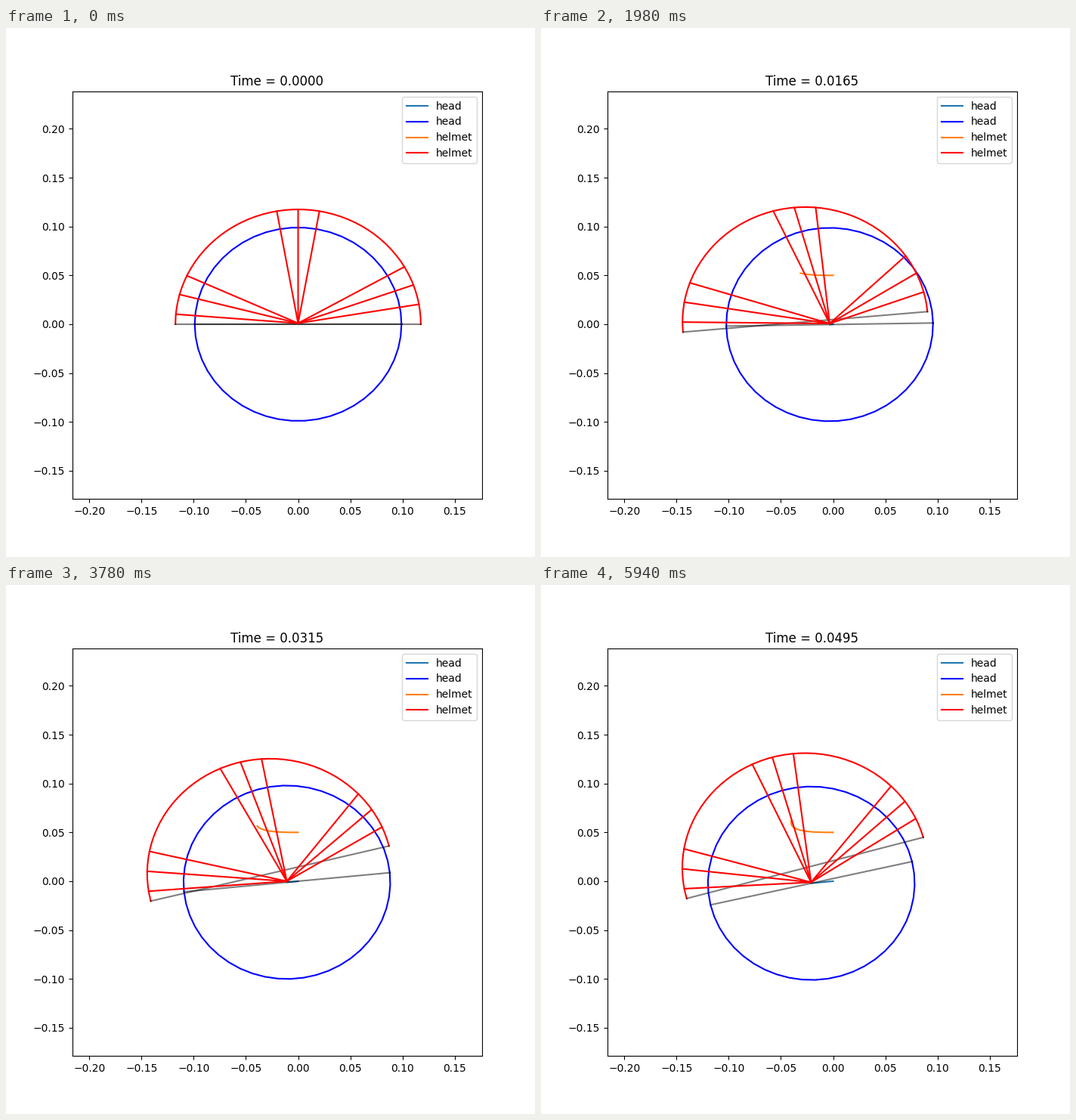
A matplotlib script that plays this animation: 700 px wide and 700 px high, repeating every 6 s.

```python
import numpy as np
import matplotlib.pyplot as plt
from matplotlib.animation import FuncAnimation

FRAMES, INTERVAL, STEP = 100, 60, 0.5  # STEP is simulated ms per frame
R_HEAD, R_HELMET, CM_HEIGHT = 0.099, 0.1175, 0.05
SPRING_ANGLES = np.radians(np.add.outer([20, 90, 165], [-10, 0, 10]).ravel())
SPRING_ROOT = (0.0, 0.001)


def speed_up(t, lag):
    """Start at rest and approach unit speed, ending 2 * lag behind."""
    return t - 2 * lag + (t + 2 * lag) * np.exp(-t / lag)


def soft_start(t, start, width):
    """Smooth bend from standing still to unit speed around start."""
    return width * np.log1p(np.exp((t - start) / width))


def head_pose(t):
    """Position and angle of the head, dragged along by the springs."""
    pull = speed_up(t, 6.6)
    return -575e-6 * pull, -57e-6 * pull, 0.0071 * soft_start(t, 17.7, 4)


def helmet_pose(t):
    """The helmet slides left, is braked by the springs and turns."""
    x = -0.0397 * (1 - np.exp(-0.0755 * t) * np.cos(0.044 * t))
    y = CM_HEIGHT + 300e-6 * speed_up(t, 5.1)
    angle = 0.27 * (1 - np.exp(0.0285 * t - 0.0032 * t ** 2))
    return x, y, angle


def place(pose, x, y):
    """Move body coordinates into the plot."""
    px, py, a = pose
    c, s = np.cos(a), np.sin(a)
    x, y = np.asarray(x), np.asarray(y)
    return px + c * x - s * y, py + s * x + c * y


def arc(radius, angles, drop=0.0):
    return radius * np.cos(angles), radius * np.sin(angles) - drop


times = np.arange(FRAMES) * STEP
head_path = np.column_stack(head_pose(times))
helmet_path = np.column_stack(helmet_pose(times))

ends = np.array([np.pi, 0])
head_shape = arc(R_HEAD, np.linspace(0, 2 * np.pi, 51))
head_base = arc(R_HEAD, ends)
shell_shape = arc(R_HELMET, np.linspace(0, np.pi, 50), CM_HEIGHT)
shell_base = arc(R_HELMET, ends, CM_HEIGHT)
spring_tips = arc(R_HELMET, SPRING_ANGLES, CM_HEIGHT)

fig, ax = plt.subplots(figsize=(7, 7), dpi=100)
ax.set_xlim(-0.2164, 0.1762)
ax.set_ylim(-0.1787, 0.2382)


def line(color, **kw):
    return ax.plot([], [], color=color, **kw)[0]


head_track = line("C0", label="head")
head = line("blue", label="head")
head_axis = line("black", alpha=0.5)
helmet_track = line("C1", label="helmet")
shell = line("red", label="helmet")
shell_axis = line("black", alpha=0.5)
springs = [line("red") for _ in SPRING_ANGLES]
title = ax.set_title("Time = 0.0000")
ax.legend(loc="upper right")


def update(i):
    h, s = head_path[i], helmet_path[i]
    head_track.set_data(*head_path[:i + 1, :2].T)
    helmet_track.set_data(*helmet_path[:i + 1, :2].T)
    head.set_data(*place(h, *head_shape))
    head_axis.set_data(*place(h, *head_base))
    shell.set_data(*place(s, *shell_shape))
    shell_axis.set_data(*place(s, *shell_base))
    rx, ry = place(h, *SPRING_ROOT)
    for spring, tx, ty in zip(springs, *place(s, *spring_tips)):
        spring.set_data([rx, tx], [ry, ty])
    title.set_text(f"Time = {times[i] / 1000:.4f}")
    return head_track, helmet_track, head, head_axis, shell, shell_axis, *springs, title


anim = FuncAnimation(fig, update, frames=FRAMES, interval=INTERVAL,
                     repeat=True, repeat_delay=0, blit=False)
plt.show()
```
